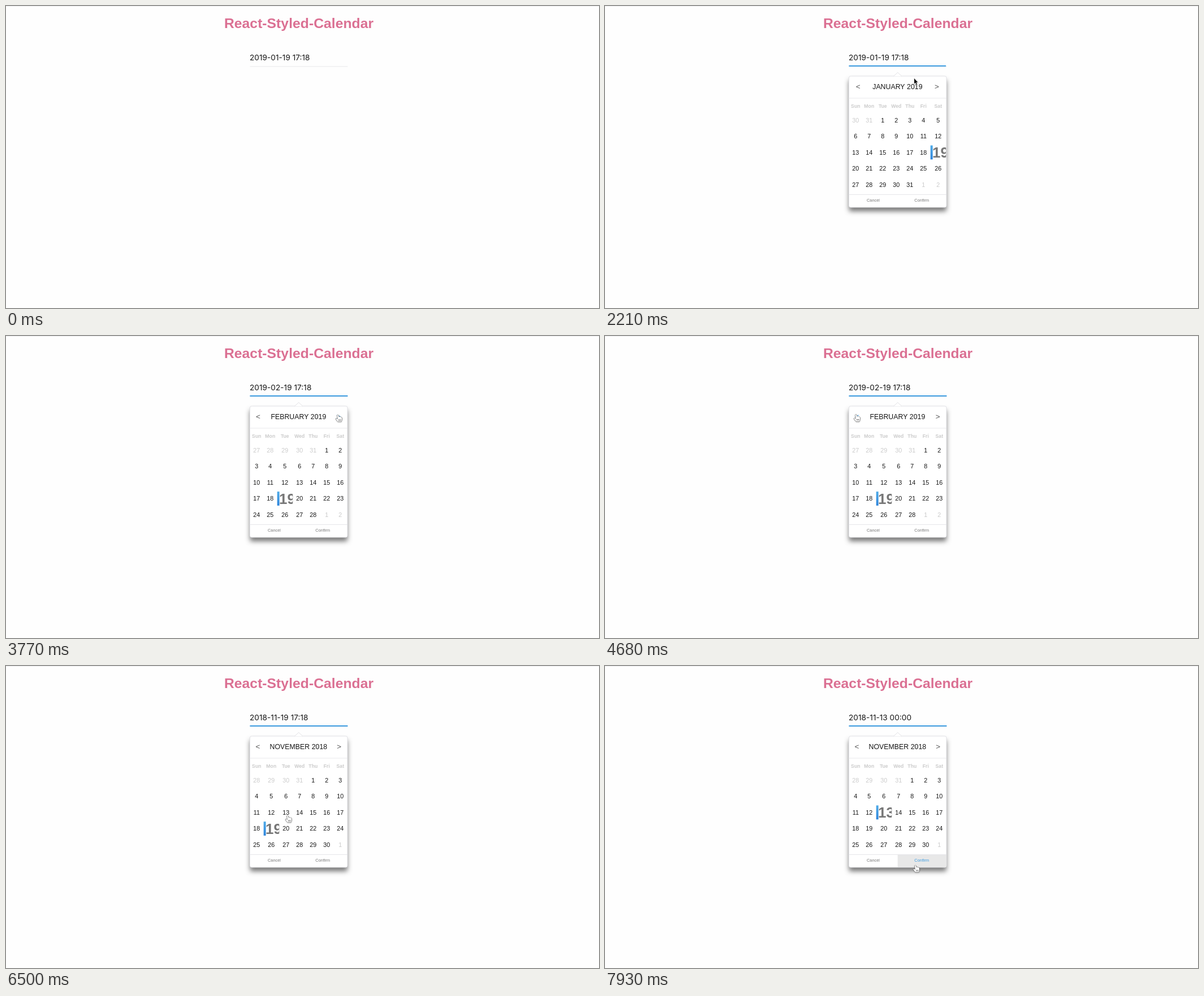
These frames come from a looping animation (1049 by 534 pixels, 8 s). An HTML page with a canvas:

```html
<!DOCTYPE html>
<html lang="en">
<head>
<meta charset="utf-8">
<title>React-Styled-Calendar</title>
<style>
html, body { margin: 0; width: 100%; height: 100%; overflow: hidden; background: #fefefe; }
canvas { display: block; }
</style>
</head>
<body>
<canvas id="stage" width="1049" height="534"></canvas>
<script>
const ctx = document.getElementById('stage').getContext('2d');
const LOOP = 8000, STEP = 130;
const SANS = '"Liberation Sans", Arial, sans-serif';
const INTER = 'Inter, sans-serif';
const BLUE = '#3d9ce0', INK = '#161616', PALE = '#cbcbcb';
const LEFT = 431.5, WIDTH = 172.5, MID = LEFT + WIDTH / 2;
const ROW = 28.6, CELL = 24, WIDE = 28;
const OPEN = 1690;

const months = ['JANUARY', 'FEBRUARY', 'MARCH', 'APRIL', 'MAY', 'JUNE', 'JULY',
  'AUGUST', 'SEPTEMBER', 'OCTOBER', 'NOVEMBER', 'DECEMBER'];
const weekdays = ['Sun', 'Mon', 'Tue', 'Wed', 'Thu', 'Fri', 'Sat'];

// start time, year, month index, day, clock
const dates = [
  [0, 2019, 0, 19, '17:18'],
  [3510, 2019, 1, 19, '17:18'],
  [4810, 2019, 0, 19, '17:18'],
  [4940, 2018, 11, 19, '17:18'],
  [5720, 2018, 10, 19, '17:18'],
  [7020, 2018, 10, 13, '00:00']
];

// pointer hotspot: time, x, y
const route = [
  [390, 560, 511], [1170, 533, 104], [1430, 534, 100], [1820, 534, 100],
  [2210, 547, 128], [2600, 556, 138], [3250, 585, 142], [3380, 587, 139],
  [3900, 587, 139], [4680, 444, 138.5], [5720, 444, 138.5],
  [6500, 498, 264], [7020, 498, 264], [7800, 549, 351], [7930, 549, 352]
];

const arrow = new Path2D('M0 0V9.5L2.1 7.6 3.7 11.3 5.2 10.7 3.6 7H6.4Z');
const hand = new Path2D('M-1 .8Q0-.6 1 .8L1.8 4Q3 3 3.8 4.1Q5 3.4 5.6 4.6Q7 4 7 6V9Q7 11 6 12.5H0L-3.4 8.2Q-4.2 6.6-2.6 6.6L-.4 8Z');
const knuckles = new Path2D('M1.6 8.5V10.8M3.3 8.5V10.8M5 8.5V10.8');
const beam = new Path2D('M-2-5Q0-5 0-3.5Q0-5 2-5M0-4V4M-2 5Q0 5 0 3.5Q0 5 2 5M-1.2 1.5H1.2');

const clamp = v => Math.max(0, Math.min(1, v));
const smooth = v => v * v * (3 - 2 * v);
const pad = n => String(n).padStart(2, '0');
const latest = (list, t) => list.filter(item => item[0] <= t).pop();

function text(str, x, y, font, color, align = 'center') {
  ctx.font = font;
  ctx.fillStyle = color;
  ctx.textAlign = align;
  ctx.fillText(str, x, y);
}

function rect(x, y, w, h, color) {
  ctx.fillStyle = color;
  ctx.fillRect(x, y, w, h);
}

function pointerAt(t) {
  const a = latest(route, t);
  if (!a) return null;
  const b = route[route.indexOf(a) + 1] || a;
  const k = b === a ? 0 : smooth((t - a[0]) / (b[0] - a[0]));
  return [a[1] + (b[1] - a[1]) * k, a[2] + (b[2] - a[2]) * k];
}

function drawPointer([x, y], t) {
  const onInput = x > LEFT && x < LEFT + WIDTH && y > 82 && y < 108;
  const onArrow = y > 132 && y < 154 && (x < 454 || x > 578);
  const onButton = t > 3250 && (onArrow || y > 190);
  ctx.save();
  ctx.translate(x, y);
  ctx.lineJoin = 'round';
  if (onInput) {
    ctx.lineWidth = 1;
    ctx.strokeStyle = '#555';
    ctx.stroke(beam);
  } else {
    ctx.shadowColor = 'rgba(0,0,0,.3)';
    ctx.shadowBlur = 2;
    ctx.shadowOffsetY = 1;
    ctx.lineWidth = onButton ? 1 : 1.2;
    ctx.strokeStyle = onButton ? '#333' : '#fff';
    ctx.fillStyle = onButton ? '#fff' : '#111';
    const shape = onButton ? hand : arrow;
    ctx.stroke(shape);
    ctx.shadowColor = 'transparent';
    ctx.fill(shape);
    if (onButton) {
      ctx.lineWidth = .7;
      ctx.stroke(knuckles);
    }
  }
  ctx.restore();
}

function drawPanel(bottom) {
  const top = 124;
  ctx.save();
  ctx.beginPath();
  ctx.roundRect(LEFT, top, WIDTH, bottom - top, 3);
  ctx.shadowColor = 'rgba(0,0,0,.52)';
  ctx.shadowBlur = 8;
  ctx.shadowOffsetY = 7;
  ctx.fillStyle = '#fff';
  ctx.fill();
  ctx.restore();
  ctx.lineWidth = 1;
  ctx.strokeStyle = '#e2e2e6';
  ctx.stroke();
  ctx.beginPath();
  ctx.moveTo(MID - 7, top);
  ctx.lineTo(MID, top - 6.5);
  ctx.lineTo(MID + 7, top);
  ctx.fillStyle = '#fff';
  ctx.fill();
  ctx.stroke();
}

function drawHeader(year, month, pointer) {
  const label = months[month] + ' ' + year;
  text(label, MID - .4, 147, '12.35px ' + SANS, INK);
  const reach = 55 + ctx.measureText(label).width / 6;
  for (const [sign, side] of [['<', -1], ['>', 1]]) {
    const x = MID - .4 + side * reach;
    const hover = Math.abs(pointer[0] - x) < 7 && Math.abs(pointer[1] - 142) < 8;
    text(sign, x, 147.3, '13.5px ' + SANS, hover ? BLUE : '#555');
  }
  rect(LEFT, 162.5, WIDTH, 1, '#e9e9ec');
}

function drawActive(day, x, y) {
  const fill = ctx.createLinearGradient(0, y - 12, 0, y + 12);
  fill.addColorStop(0, '#4fabe8');
  fill.addColorStop(1, '#2f86dc');
  rect(x + .4, y - 12.3, 4, 24.8, fill);
  ctx.save();
  ctx.beginPath();
  ctx.rect(x, y - 14, WIDE, 28);
  ctx.clip();
  text(day, x + 3.7, y + 9.2, 'bold 26px ' + SANS, '#777', 'left');
  ctx.restore();
}

function drawDays(year, month, day, first, rows) {
  const activeCol = (first + day - 1) % 7;
  const cellLeft = col => LEFT - .2 + col * CELL + (col > activeCol ? WIDE - CELL : 0);
  const center = col => cellLeft(col) + (col === activeCol ? WIDE : CELL) / 2;
  weekdays.forEach((name, col) => text(name, center(col), 179.7, 'bold 8.7px ' + SANS, PALE));
  for (let i = 0; i < rows * 7; i++) {
    const date = new Date(year, month, 1 - first + i);
    const inMonth = date.getMonth() === month;
    const col = i % 7, y = 201.6 + Math.floor(i / 7) * ROW;
    if (inMonth && date.getDate() === day) drawActive(day, cellLeft(col), y);
    else text(date.getDate(), center(col), y + 3.9, '10.8px ' + SANS, inMonth ? INK : PALE);
  }
}

function drawFooter(bottom, pointer) {
  const top = bottom - 23;
  const hover = pointer[0] > MID && pointer[1] > top && pointer[1] < bottom;
  if (hover) {
    ctx.beginPath();
    ctx.roundRect(MID, top, WIDTH / 2, 23, [0, 0, 3, 0]);
    ctx.fillStyle = '#e8e8e8';
    ctx.fill();
  }
  rect(LEFT, top, WIDTH, 1, '#e6e6e9');
  text('Cancel', 474.5, top + 13, '7.4px ' + SANS, '#777');
  text('Confirm', 560.3, top + 13, '7.4px ' + SANS, hover ? BLUE : '#777');
}

function draw(t) {
  const [, year, month, day, clock] = latest(dates, t);
  const pointer = pointerAt(t);
  rect(0, 0, 1049, 534, '#fefefe');
  rect(0, 0, 1049, 1, '#f0f0f2');
  text('React-Styled-Calendar', 518, 38.7, 'bold 24.75px ' + SANS, '#db7093');
  text(`${year}-${pad(month + 1)}-${pad(day)} ${clock}`, 431, 96, '13.7px ' + INTER, INK, 'left');
  rect(LEFT, 106.5, WIDTH + .5, 1, '#e9e9ec');

  if (t >= OPEN) {
    const grow = 1 - (1 - clamp((t - OPEN) / 650)) ** 3;
    rect(LEFT, 105, (WIDTH + .5) * grow, 2, BLUE);
    const first = new Date(year, month, 1).getDay();
    const rows = Math.ceil((first + new Date(year, month + 1, 0).getDate()) / 7);
    const bottom = 356 + (rows - 5) * ROW;
    ctx.globalAlpha = clamp((t - OPEN + STEP) / 390);
    drawPanel(bottom);
    drawHeader(year, month, pointer);
    drawDays(year, month, day, first, rows);
    drawFooter(bottom, pointer);
    ctx.globalAlpha = 1;
  }
  if (pointer) drawPointer(pointer, t);
}

const begin = performance.now();
function tick() {
  const t = (performance.now() - begin) % LOOP;
  draw(Math.floor(t / STEP) * STEP);
  requestAnimationFrame(tick);
}
tick();
</script>
</body>
</html>
```
